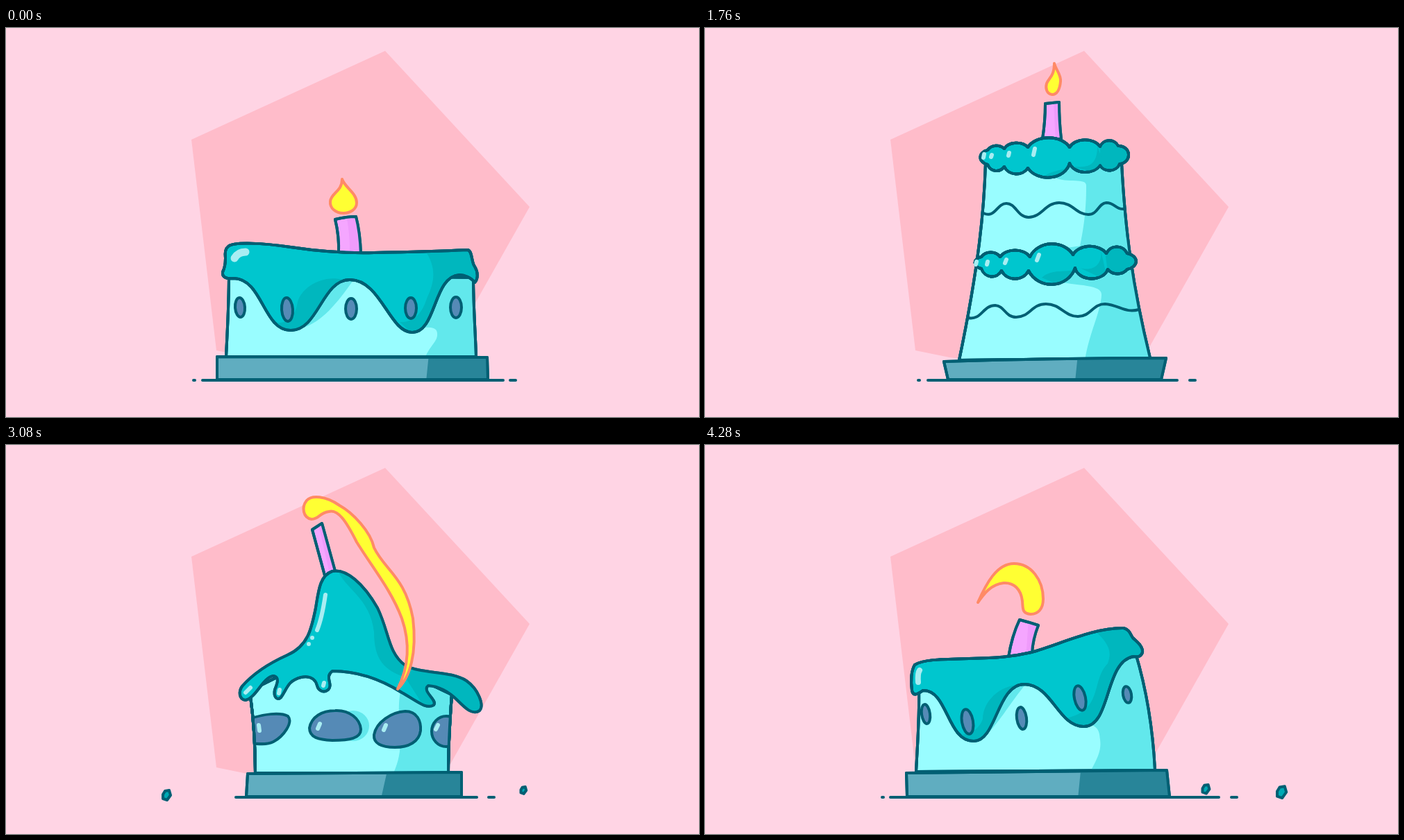
An HTML page with a canvas that plays this animation: 998x561 px, repeating every 4.36 s.

```html
<!DOCTYPE html>
<html lang="en">
<head>
<meta charset="utf-8">
<title>Cake</title>
<style>
html, body { margin: 0; width: 100%; height: 100%; overflow: hidden; background: #ffd4e4; }
canvas { display: block; }
</style>
</head>
<body>
<canvas id="stage" width="998" height="561"></canvas>
<script>
const ctx = document.getElementById('stage').getContext('2d');
const LOOP = 4360, FLOOR = 508, MID = 499;
const LINE = '#005f73', GLOSS = '#a8edf2';
// Lower case: outlined shape. Upper case: clipped to the shape before it.
const FILL = {
  b: '#99fdff', B: '#62e8ec', f: '#00c6ce', F: '#00b7be', p: '#60adc0', P: '#288599',
  c: '#f5a6ff', D: '#ef9bfb', s: '#558ab6', S: '#558ab6', y: '#ffff33', k: '#00a9b4'
};

// A path is SVG data, or "@x,y,rx,ry,degrees" for an ellipse.
function toPath(text) {
  if (text[0] !== '@') return new Path2D(text);
  const [x, y, rx, ry, turn = 0] = text.slice(1).split(',').map(Number);
  const path = new Path2D();
  path.ellipse(x, y, rx, ry, turn * Math.PI / 180, 0, 7);
  return path;
}

// ground: left dot, line start, line end, right dash; calm: offset of the resting flame
const cake = (ground, calm, flame, parts) => ({
  ground, calm, flame: toPath(flame),
  parts: parts.trim().split('\n').map(row => [row[0], toPath(row.slice(2))])
});

const DROP = 'M484,218 C488,230 505,238 505,252 C505,262 495,267 486,267 C475,267 466,260 467,250 C468,238 484,236 484,218Z';

const drip = cake([270, 283, 716, 726], [0, 0], DROP, `
b M321,355 C321,400 319,430 317,474 L677,474 C676,440 673,400 673,360Z
B M604,474 C612,456 622,452 621,440 C620,430 608,432 596,432 L640,340 690,340 690,474Z
B M500,364 C478,395 455,425 425,433 L440,370Z
c M474,276 Q490,272 504,272 Q510,295 511,326 L479,326 Q480,300 474,276Z
D M490,270 Q496,300 495,330 L520,330 520,270Z
f M320,315 C328,308 370,310 410,316 C450,322 490,325 530,324 C580,323 620,322 665,320 C672,322 670,338 675,344 C680,352 680,362 675,367 C670,360 660,356 653,356 C615,358 620,439 585,439 C552,439 540,363 495,363 C455,363 450,436 410,436 C370,436 370,362 328,361 C318,362 311,360 312,352 C315,346 316,340 316,332 C315,324 316,318 320,315Z
F M603,320 C620,345 618,365 606,390 C600,410 588,425 567,424 L590,445 690,445 690,310Z
F M485,363 C455,355 425,375 420,395 C417,415 405,428 385,425 L410,445 440,430Z
s @337,403,7,14,-4
s @405,406,8,17,-4
s @497,405,8,15
s @583,404,8,15
s @648,403,8,15
H M329,332 Q334,323 345,323
p M304,474 L693,475 694,507 304,507Z
P M609,470 L605,510 700,510 700,470Z`);

const lean = cake([255, 267, 740, 758], [0, 0],
  'M393,227 C405,200 420,171 445,171 C470,171 487,195 487,222 C487,236 480,244 469,244 C456,243 458,235 457,225 C455,208 445,198 430,199 C412,201 402,214 393,227Z', `
b M308,350 C309,395 306,430 304,471 L648,469 C645,410 635,350 620,300Z
B M556,469 C566,450 571,440 569,425 C568,412 566,405 550,402 L590,300 660,300 660,470Z
B M462,345 C440,370 420,408 398,424 L420,350Z
c M453,252 Q468,256 480,260 Q472,280 471,300 L437,306 Q442,275 453,252Z
D M466,250 L462,310 490,310 490,250Z
f M302,317 C315,309 340,309 380,308 C420,307 440,306 470,299 C510,288 560,263 603,264 C612,267 612,272 616,278 C622,284 631,290 630,299 C628,305 624,306 617,305 C575,312 585,407 545,406 C508,405 500,346 460,345 C420,345 420,427 387,427 C348,427 350,353 314,354 C308,358 300,364 298,354 C296,340 297,325 302,317Z
F M562,268 C585,290 585,300 580,315 C555,340 575,385 515,395 L545,415 640,400 640,255Z
F M455,346 C425,345 400,370 400,395 C395,410 380,420 362,417 L387,430 420,410Z
s @318,388,6,14,-8
s @378,399,8,18,-10
s @456,394,7,16,-8
s @540,365,8,18,-12
s @608,360,6,12,-10
h M307,342 Q306,329 309,325
p M290,473 L665,469 669,507 291,507Z
P M541,470 L537,510 680,510 680,460Z`);

const bowl = cake([251, 264, 740, 758], [0, 0],
  'M463,104 C480,125 480,150 476,170 C472,200 475,215 488,235 C503,255 497,275 500,295 Q506,312 503,319 C497,322 488,315 487,300 C483,280 489,262 478,240 C465,220 463,205 470,180 C474,150 478,130 463,104Z', `
b M303,321 C255,360 260,440 291,479 Q490,497 689,482 C740,425 735,360 705,314 L500,385Z
B M617,487 C623,475 620,464 608,464 L580,465 640,350 640,300 740,300 740,490Z
B M490,396 C465,410 455,440 430,458 L440,400Z
c M492,337 L517,329 521,331 Q524,352 530,372 Q510,382 488,372 Q491,355 492,337Z
f M303,321 C320,295 350,276 378,279 C390,284 384,292 375,296 C366,303 373,314 383,315 C395,314 405,304 417,313 C425,322 415,338 428,347 C440,353 460,352 475,360 C490,367 495,377 510,377 C527,377 530,355 550,348 C565,345 575,350 588,345 C600,340 592,318 605,315 C618,313 628,320 638,318 C642,305 634,285 637,272 C640,263 655,267 665,273 C685,285 698,300 706,316 C625,315 640,464 575,464 C535,464 540,396 497,396 C455,396 455,461 416,461 C360,461 365,335 303,321Z
F M605,332 L632,332 C630,360 605,385 605,415 C603,440 590,455 570,455 L575,470 720,470 720,250 600,250Z
F M490,396 C455,395 440,420 440,455 L450,455 490,400Z
s M320,339 Q325,345 324,365 Q328,390 321,404 Q312,409 305,404 Q293,397 294,387 C298,370 300,345 320,339Z
s M428,387 Q433,400 431,418 Q431,434 421,436 Q408,432 408,420 C408,405 414,390 428,387Z
s M504,415 Q511,424 514,448 Q518,457 513,459 L494,459 Q488,453 490,443 C490,430 495,415 504,415Z
s M568,388 Q580,396 588,408 Q589,425 581,432 Q572,435 567,427 C565,415 564,400 568,388Z
s M670,341 C685,339 697,350 701,372 Q702,385 695,391 Q685,398 677,392 C662,380 675,370 668,355 Q663,346 670,341Z
i M328,307 Q336,298 346,293
i M319,316 l0,.1
p M282,479 Q490,497 699,482 L681,507 293,507Z
P M612,480 L611,510 710,510 710,470Z`);

const tower = cake([307, 321, 680, 698], [0, 0],
  'M503,51 C505,60 513,67 512,77 C511,88 507,96 500,96 C492,95 490,87 492,80 C495,72 503,70 503,51Z', `
c M490,109 L510,107 Q510,135 513,160 L486,160 Q490,135 490,109Z
D M502,105 L505,165 520,165 520,105Z
b M404,195 C402,260 395,340 366,479 L641,476 C615,370 605,290 600,195Z
B M500,215 C525,225 550,215 549,228 C549,265 545,290 540,315 L660,300 640,190 500,200Z
B M500,365 C540,372 572,370 571,385 C570,410 553,440 547,480 L660,480 640,300 500,320Z
o M401,267 C418,275 420,253 434,253 C448,253 450,273 466,273 C485,273 490,252 510,252 C530,252 535,269 552,269 C566,269 566,253 578,252 C590,252 592,262 603,261
o M379,418 C398,422 400,400 418,400 C432,401 432,417 448,417 C468,417 470,398 491,398 C512,398 518,416 537,416 C556,416 558,398 576,398 C596,399 605,412 625,406
f M407,176 A15,13 0 0 1 431,174 A19,13 0 0 1 465,172 A32,21 0 0 1 525,172 A24,17 0 0 1 569,171 A14,13 0 0 1 595,170 A14,13 0 0 1 597,196 A15,13 0 0 1 569,198 A24,19 0 0 1 525,195 A32,25 0 0 1 465,202 A19,17 0 0 1 431,200 A14,15 0 0 1 407,197 A15,11 0 0 1 407,176Z
F M569,160 L569,212 620,212 620,155Z
F M487,215 C500,203 525,207 528,193 L535,220Z
F M527,200 C545,200 565,205 565,170 L580,212Z
f M398,330 A16,14 0 0 1 425,330 A24,17 0 0 1 468,330 A34,29 0 0 1 530,327 A26,18 0 0 1 578,325 A17,18 0 0 1 608,325 A18,12 0 0 1 608,348 A17,15 0 0 1 580,348 A24,18 0 0 1 533,346 A36,34 0 0 1 466,350 A22,22 0 0 1 427,350 A16,17 0 0 1 398,347 A14,9 0 0 1 398,330Z
F M580,310 L577,330 582,365 640,365 640,310Z
F M485,360 C500,345 530,355 532,346 L520,375Z
F M540,346 C560,352 573,340 570,320 L580,365Z
i M402,182 l-1,5 M413,183 l-1,3 M438,180 l-1,4 M475,174 l-2,9
i M391,337 l-1,4 M407,337 l-1,4 M434,334 l-2,5 M481,327 l-3,8
p M344,481 Q500,476 664,476 L657,507 350,507Z
P M537,470 L533,510 680,510 680,470Z`);

const dome = cake([262, 276, 706, 720], [-6, -20],
  'M275,228 C285,260 305,310 345,310 C385,310 385,250 400,215 C415,185 440,173 470,174 C505,175 524,200 524,220 C523,240 513,251 501,250 C485,247 476,235 480,215 C486,195 478,184 460,184 C420,186 410,235 395,270 C385,305 375,324 345,324 C300,323 295,265 275,228Z', `
c M463,250 L495,260 Q482,285 477,312 L419,300 Q445,275 463,250Z
D M478,250 L462,315 500,315 500,250Z
b M258,402 C258,450 275,463 299,490 L693,492 C693,470 690,450 684,437 L640,390 400,390Z
B M480,443 C520,432 555,432 549,458 C546,475 536,490 527,505 L700,505 700,400 480,400Z
B M400,415 C410,430 425,440 460,455 L440,400Z
f M258,403 C240,408 240,375 251,347 C265,310 305,288 350,288 C385,288 430,304 477,309 C530,312 565,325 592,341 C640,370 675,395 685,435 C687,440 688,444 688,448 C680,436 668,429 659,429 C635,430 620,460 604,460 C580,460 580,400 547,400 C510,402 490,457 457,457 C430,456 425,419 400,419 C370,419 365,461 339,461 C305,459 295,410 270,400 C265,399 261,401 258,403Z
F M510,305 C520,360 505,400 470,425 C450,438 430,440 405,437 L457,470 710,470 710,300Z
F M392,416 C370,412 362,420 355,435 C348,448 335,455 322,452 L340,465 380,440 400,425Z
h M263,366 Q267,340 282,329
h M294,317 l0,.1
H M318,426 l4,7
p M287,489 Q480,494 703,491 L697,507 295,507Z
P M533,485 L527,510 710,510 710,480Z`);

const peak = cake([null, 331, 678, 695], [0, 0],
  'M564,352 C580,320 582,285 570,250 C555,210 530,180 505,140 C490,110 478,92 465,96 C450,98 452,107 440,107 C428,105 425,90 433,80 C440,72 460,73 480,87 C500,98 525,125 530,148 C545,180 575,190 586,250 C592,300 582,335 564,352Z', `
c M441,122 L455,113 474,182 459,188Z
D M449,110 L467,190 480,190 470,110Z
b M352,362 C357,400 359,430 359,473 L637,473 C637,430 639,400 642,360 L600,340 480,310 400,330 360,350Z
B M568,355 C560,400 578,430 558,473 L660,473 660,340Z
B @500,405,23,22
S M350,395 C370,388 395,385 406,391 C414,400 400,420 385,428 C375,433 360,431 350,430Z
S M474,383 C495,382 510,395 511,410 C511,423 495,426 470,426 C450,425 437,422 437,408 C440,392 455,383 474,383Z
S M575,384 C592,384 598,398 597,412 C595,428 580,436 560,436 C540,436 529,430 530,418 C533,400 555,385 575,384Z
S @634,413,21,22
i M364,404 l1,8 M452,402 l-3,7 M547,404 l-3,7 M622,404 l-3,6
f M470,182 C490,178 515,200 535,235 C552,270 550,300 575,318 C600,331 640,325 663,340 C680,352 689,375 682,383 C672,390 662,380 650,368 C640,358 625,348 608,347 C598,355 622,368 616,375 C605,382 590,368 570,357 C535,335 500,326 470,326 C458,335 472,345 464,353 C458,358 450,355 448,347 C445,335 435,333 425,335 C405,340 405,352 396,364 C390,370 385,362 387,353 C390,345 395,335 385,333 C370,335 360,365 345,368 C335,367 335,355 340,348 C360,325 385,312 405,303 C435,290 440,265 446,235 C450,210 452,188 470,182Z
F M478,180 C485,205 525,220 530,270 C530,310 545,325 575,335 L610,390 700,390 700,300 560,180Z
i M460,216 Q455,250 448,267
i M441,278 l0,.1 M436,287 l0,.1
i M345,357 l7,-7 M393,358 l1,-5 M457,347 l1,-4
p M348,474 L656,472 656,507 346,507Z
P M549,470 L540,510 670,510 670,470Z`);

const scoop = cake([236, 249, 728, 745], [-18, -40],
  'M494,143 C505,145 512,150 508,158 C500,172 470,180 460,200 C453,212 455,224 464,226 C472,225 470,218 470,210 C472,195 482,185 485,180 C500,168 510,158 508,152 Q503,146 494,143Z', `
c M457,240 L482,234 Q486,258 493,272 L462,275 Q460,255 457,240Z
f M374,358 C366,346 376,338 395,349 C375,322 405,300 441,344 C425,315 428,268 490,267 C545,270 560,305 547,333 C565,325 575,338 568,350 L568,358Z
F M512,268 C525,300 520,325 505,340 C515,335 522,345 520,355 L580,360 580,260Z
h M452,288 Q443,310 449,337
h M455,348 l0,.1
h M402,328 Q396,330 400,338
h M377,350 l0,.1
b M303,363 L649,349 Q665,415 687,482 L294,486 Q297,420 303,363Z
B M577,340 L591,490 700,490 700,340Z
B @423,437,22,28
B @546,424,23,27
S @415,439,23,29,-15
S @537,427,25,30,-5
S @641,424,26,30
S @318,450,21,28,-10
h M303,442 q-2,6 1,13
h M399,429 q-1,8 2,14
h M518,417 q-2,8 1,14
p M282,486 L706,480 706,507 286,507Z
P M573,475 L574,510 710,510 710,475Z`);

// time, cake, resting flame?, width, height, sideways lean
const keys = [
  [0, drip, 0, 1, 1, 0], [120, drip, 0, 1, 1, .13], [240, drip, 0, 1, 1.03, -.05],
  [360, drip, 0, 1, .98, .02], [480, drip, 0, 1, 1, 0], [600, drip, 0, 1, 1, 0],
  [720, drip, 0, 1.15, .78, 0], [760, bowl, 0, 1, 1, 0], [840, bowl, 0, 1.04, .88, 0],
  [880, tower, 0, .85, 1.06, 0], [960, tower, 0, .82, 1.09, 0], [1040, tower, 0, 1.07, .92, .02],
  [1120, tower, 0, .97, 1.04, -.02], [1200, tower, 0, 1, 1, 0], [1320, tower, 0, .99, 1.05, .01],
  [1440, tower, 0, 1, .98, -.01], [1560, tower, 0, 1, 1, 0], [1760, tower, 0, 1, 1, 0],
  [1880, tower, 0, 1.28, .6, 0], [1920, dome, 0, .8, 1.48, 0], [2040, dome, 0, 1, 1, 0],
  [2080, dome, 1, 1.04, .88, .08], [2160, dome, 1, .97, 1.06, .1], [2320, dome, 1, 1, 1, 0],
  [2400, dome, 1, 1, 1.04, -.04], [2560, dome, 1, 1, .98, .02], [2760, dome, 1, 1, 1, 0],
  [2920, dome, 1, 1, 1, 0], [3000, dome, 1, 1.1, .75, 0], [3080, peak, 0, 1, 1, 0],
  [3160, peak, 0, 1.06, .85, 0], [3240, scoop, 1, .82, 1.16, 0], [3320, scoop, 1, .88, 1.06, .04],
  [3400, scoop, 1, .85, 1.12, 0], [3600, scoop, 1, .85, 1.12, 0], [3760, scoop, 0, 1, 1, 0],
  [3840, scoop, 0, 1.06, .75, 0], [3920, drip, 0, .82, 1.28, 0], [4000, drip, 0, 1.08, .88, 0],
  [4120, lean, 0, .98, 1.08, .04], [4200, lean, 0, 1.02, .94, -.02], [4280, lean, 0, 1, 1, 0]
];

// Start of each passage and how long its drawings are held
const passages = [[0, 40], [40, 80], [600, 40], [1200, 80], [1760, 40], [2320, 80], [2920, 80], [3520, 80], [4120, 80]];

// x from, x to, time from, time to, hop height, size
const crumbs = [
  [285, 168, 840, 1080, 40, 1], [710, 864, 840, 1080, 40, .8],
  [318, 144, 3000, 3160, 1, 1], [670, 940, 3000, 3288, 10, .7],
  [700, 940, 3920, 4060, 30, 1], [680, 741.5, 4120, 4360, 11, .9], [680, 905, 4120, 4360, 6, 1.2]
];
const crumbShape = new Path2D('M-2,-6 L4,-7 6,0 1,7 -5,5 -5,-1Z');

const lerp = (a, b, k) => a + (b - a) * k;
const drop = toPath(DROP);

function moved(path, matrix) {
  const copy = new Path2D();
  copy.addPath(path, matrix);
  return copy;
}

function stroke(path, color = LINE, width = 4) {
  ctx.strokeStyle = color;
  ctx.lineWidth = width;
  ctx.stroke(path);
}

function drawParts(parts, matrix) {
  const gloss = { i: 6, h: 8, H: 11 };
  let last;
  for (const [kind, shape] of parts) {
    const path = moved(shape, matrix);
    if (gloss[kind]) { stroke(path, GLOSS, gloss[kind]); continue; }
    if (kind === 'o') { stroke(path); continue; }
    ctx.fillStyle = FILL[kind];
    if (kind < 'a') {
      ctx.save();
      ctx.clip(last);
      ctx.fill(path);
      if (kind === 'S') stroke(path);
      ctx.restore();
      stroke(last);
    } else {
      ctx.fill(path);
      stroke(path);
      if (kind !== 's') last = path;
    }
  }
}

function drawGround([dot, from, to, dash], scale) {
  const at = x => MID + (x - MID) * scale;
  const line = (a, b) => stroke(new Path2D(`M${a},${FLOOR}H${b}`));
  if (dot) line(at(dot), at(dot) + 2);
  line(at(from), at(to));
  line(at(dash), at(dash) + 8);
}

function drawCrumbs(t) {
  for (const [x0, x1, t0, t1, hop, size] of crumbs) {
    const k = (t - t0) / (t1 - t0);
    if (k < 0 || k >= 1) continue;
    const m = new DOMMatrix([size, 0, 0, size, lerp(x0, x1, k), 506 - 4 * hop * k * (1 - k)]);
    drawParts([['k', crumbShape]], m);
  }
}

function draw(t) {
  const n = keys.findLastIndex(key => key[0] <= t);
  const a = keys[n], next = keys[n + 1];
  const b = next && next[1] === a[1] ? next : a;
  const k = b === a ? 0 : (t - a[0]) / (b[0] - a[0]);
  const [sx, sy, tilt] = [3, 4, 5].map(i => lerp(a[i], b[i], k * k * (3 - 2 * k)));
  const { ground, calm, flame, parts } = a[1];
  const matrix = new DOMMatrix([sx, 0, -tilt, sy, MID * (1 - sx) + FLOOR * tilt, FLOOR * (1 - sy)]);

  ctx.fillStyle = '#ffd4e4';
  ctx.fillRect(0, 0, 998, 561);
  ctx.fillStyle = '#ffbcca';
  ctx.fill(new Path2D('M546,33 L754,258 614,506 352,475 303,465 267,161Z'));
  drawGround(ground, sx);
  drawParts(parts, matrix);
  const fire = a[2] ? moved(drop, matrix.translate(...calm)) : moved(flame, matrix);
  ctx.fillStyle = FILL.y;
  ctx.fill(fire);
  stroke(fire, '#ff8a66');
  drawCrumbs(t);
}

function tick() {
  const t = performance.now() % LOOP;
  const [start, hold] = passages.findLast(p => p[0] <= t);
  draw(start + Math.floor((t - start) / hold) * hold);
  requestAnimationFrame(tick);
}

ctx.lineCap = ctx.lineJoin = 'round';
tick();
</script>
</body>
</html>
```
